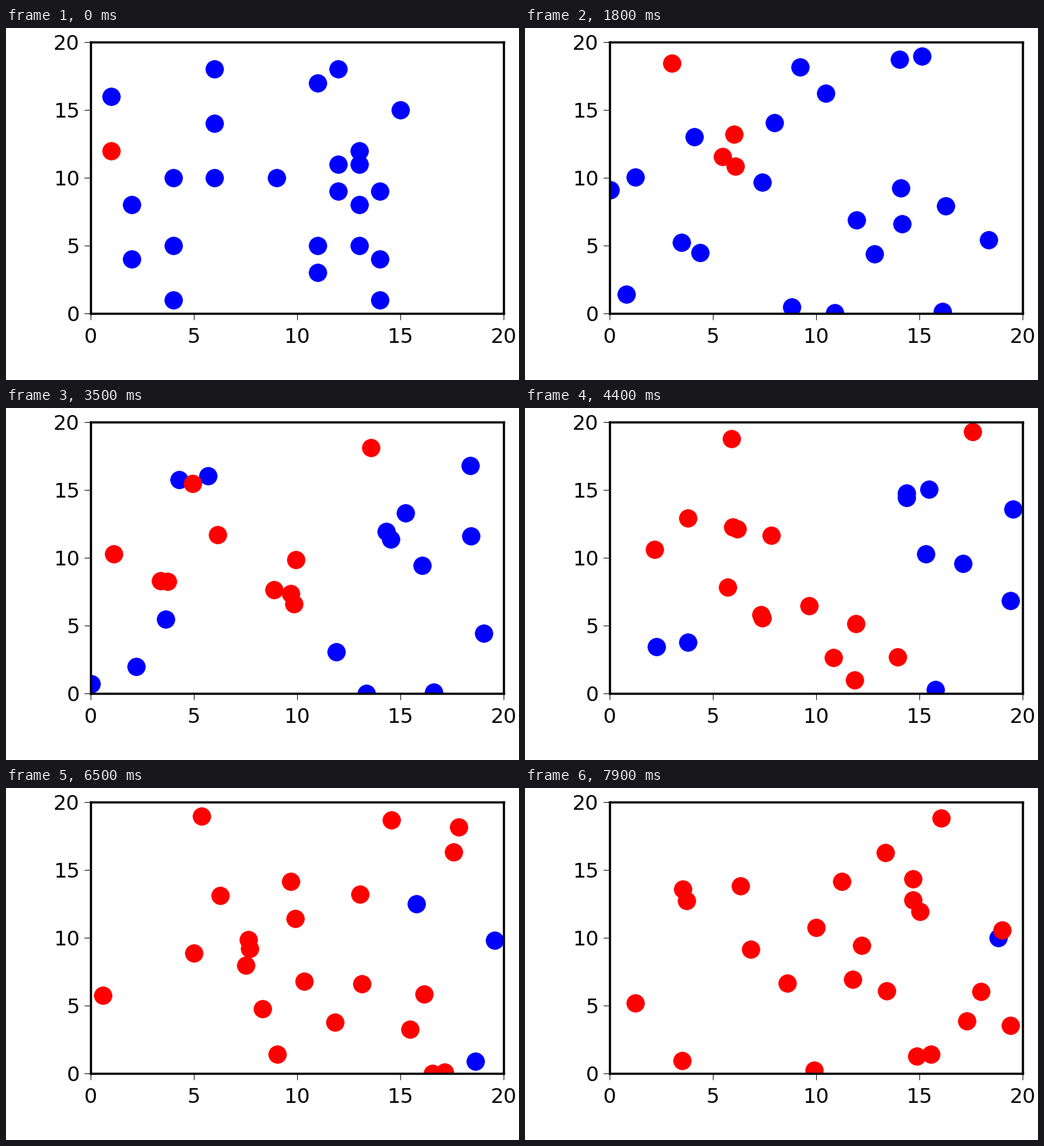
A matplotlib script that plays this animation: 800x550 px, repeating every 8 s.

```python
import numpy as np
import matplotlib.pyplot as plt
from matplotlib.animation import FuncAnimation

WIDTH, HEIGHT, DPI = 800, 550, 100
PX = 72 / DPI  # one pixel in points
FRAMES, INTERVAL = 80, 100
SIZE = 20
MAX_STEP = 0.45
GROWTH = 0.08

# Starting heights of the dots in each column; the first dot is the sick one.
COLUMNS = {1: (12, 16), 2: (4, 8), 4: (1, 5, 10), 6: (10, 14, 18), 9: (10,),
           11: (3, 5, 17), 12: (9, 11, 18), 13: (5, 8, 11, 12),
           14: (1, 4, 9), 15: (15,)}
start = np.array([(x, y) for x, heights in COLUMNS.items() for y in heights])
count = len(start)
step = np.random.default_rng(7).uniform(-MAX_STEP, MAX_STEP, (count, 2))


def positions(frame):
    """Straight paths, mirrored at the walls."""
    return SIZE - abs((start + step * frame) % (2 * SIZE) - SIZE)


def sick_count(frame):
    """Logistic spread from a single case."""
    return round(count / (1 + (count - 1) * np.exp(-GROWTH * frame)))


def infection_frames():
    """The healthy dot closest to a sick one is always the next to fall ill."""
    caught = np.full(count, FRAMES)
    caught[0] = 0
    for frame in range(FRAMES):
        points = positions(frame)
        while (caught <= frame).sum() < sick_count(frame):
            sick = caught <= frame
            gaps = np.linalg.norm(points[:, None] - points[sick], axis=2).min(axis=1)
            gaps[sick] = np.inf
            caught[gaps.argmin()] = frame
    return caught


caught = infection_frames()

fig = plt.figure(figsize=(WIDTH / DPI, HEIGHT / DPI), dpi=DPI, facecolor="white")
ax = fig.add_axes([132 / WIDTH, 104 / HEIGHT, 644 / WIDTH, 424 / HEIGHT])
ax.set(xlim=(0, SIZE), ylim=(0, SIZE),
       xticks=range(0, SIZE + 1, 5), yticks=range(0, SIZE + 1, 5))
ax.tick_params(length=10 * PX, width=0.7, labelsize=32 * PX, labelfontfamily="DejaVu Sans")
ax.tick_params(axis="x", pad=12.5 * PX)
ax.tick_params(axis="y", pad=7 * PX)
for spine in ax.spines.values():
    spine.set_linewidth(2.5)


def dots(color):
    return ax.plot([], [], "o", color=color, markersize=20, markeredgewidth=0.5)[0]


healthy_dots, sick_dots = dots("#0000ff"), dots("#ff0000")


def update(frame):
    points, sick = positions(frame), caught <= frame
    healthy_dots.set_data(*points[~sick].T)
    sick_dots.set_data(*points[sick].T)
    return healthy_dots, sick_dots


anim = FuncAnimation(fig, update, frames=FRAMES, interval=INTERVAL,
                     init_func=lambda: update(0), repeat=True, repeat_delay=0)
plt.show()
```
